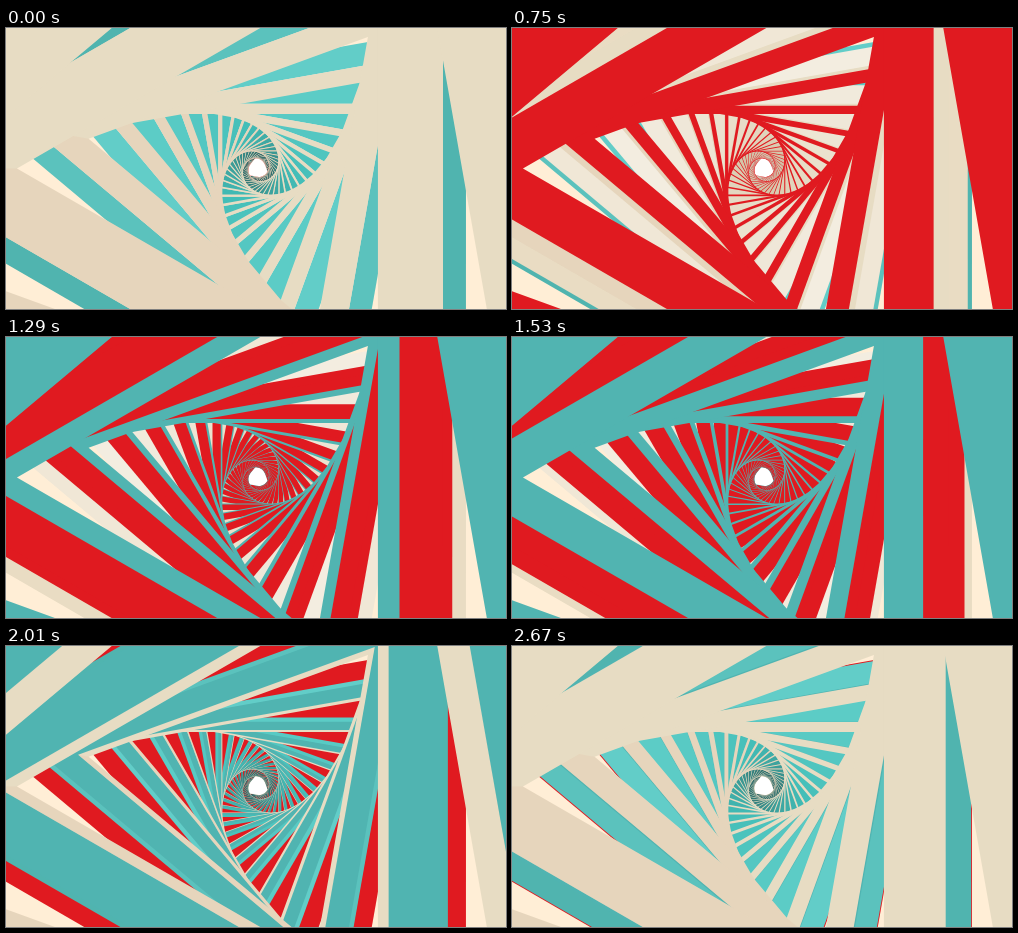
Recreate the animation shown at these times as an HTML page without scripts. Size 500 px wide and 281 px high, loop 2700 ms.

```html
<!DOCTYPE html>
<html lang="en">
<head>
<meta charset="utf-8">
<title>Triangle tunnel</title>
<style>
@property --front { syntax: "<number>"; inherits: true; initial-value: 0; }
@property --flare { syntax: "<number>"; inherits: true; initial-value: 0; }

html, body { margin: 0; height: 100%; overflow: hidden; background: #fff; }

svg {
  display: block; width: 100vw; height: 100vh; background: #fff;
  animation: front 900ms infinite, flare 900ms steps(30) infinite;
}

/* --front: depth reached by the newest colour, in plate spacings; it stays hidden for one step.
   --flare: progress of the previous colour from there to the rim. */
@keyframes front {
  0% { --front: -1; animation-timing-function: step-end; }
  3.3333% { --front: 0.029; animation-timing-function: steps(29); }
  100% { --front: 0.872; }
}
@keyframes flare { from { --flare: 0; } to { --flare: 1; } }

/* One plate: --k counts inward, perspective gives the size */
.tunnel > g {
  --z: calc(var(--k) + 2.485);
  --rim: calc(1.05 + var(--k) * (0.2 + 0.05 * min(var(--k), 3)));
  --up: max(var(--k), 0);
  --red: #e01a20;
  --flat-teal: #51b4b1;
  --flat-beige: #e7dcc3;
  --teal: hsl(177 min(40% + 6% * var(--up), 54% - 0.6% * var(--up)) max(32%, min(51% + 5% * var(--up), 62% - 1.3% * var(--up))));
  --deep-teal: hsl(178 40% max(32%, min(51%, 62% - 1.3% * var(--up))));
  --beige: hsl(40 calc(46% - 0.8% * var(--up)) max(74%, min(84% + 5% * var(--up), 94% - 1.2% * var(--up))));
  transform: rotate(calc(var(--k) * 10deg)) scale(calc(299 / var(--z)));
  animation: colours 2700ms step-end infinite;
}

@keyframes colours {
  0%, 100% {
    --new: var(--red); --mid: var(--beige); --tone: var(--flat-beige); --old: var(--teal);
    --new-tint: 0; --tone-tint: 0.4;
  }
  33.3333% {
    --new: var(--flat-teal); --mid: var(--red); --tone: var(--red); --old: var(--beige);
    --new-tint: 0; --tone-tint: 0;
  }
  66.6667% {
    --new: var(--flat-beige); --mid: var(--teal); --tone: var(--deep-teal); --old: var(--red);
    --new-tint: 0.4; --tone-tint: 0;
  }
}

.band { transform: scale(calc(var(--z) / (var(--z) - var(--s)))); }
.old { --s: var(--rim); fill: var(--old); }
.mid { --s: calc(0.872 + var(--flare) * (var(--rim) - 0.872)); fill: var(--mid); }
.tone { --s: 0.872; fill: var(--tone); }
.new { --s: var(--front); fill: var(--new); }
.tint { fill: #e4cab2; }
.tone.tint { fill-opacity: var(--tone-tint); }
.new.tint { fill-opacity: var(--new-tint); }
</style>
</head>
<body>
<svg viewBox="0 0 500 281">
  <defs>
    <mask id="plate" maskUnits="userSpaceOnUse" x="-42" y="-42" width="84" height="84">
      <path fill="#fff" fill-rule="evenodd" d="M-42-42H42V42H-42zM-2 0L1-1.73205V1.73205z"/>
    </mask>
    <g id="wall" mask="url(#plate)">
      <path fill="#ffeed6" d="M-42-42H42V42H-42z"/>
      <path class="band old" d="M-2 0L1-1.73205V1.73205z"/>
      <path class="band mid" d="M-2 0L1-1.73205V1.73205z"/>
      <path class="band tone" d="M-2 0L1-1.73205V1.73205z"/>
      <path class="band tone tint" d="M0 0L-2 0L1 1.73205z"/>
      <path class="band new" d="M-2 0L1-1.73205V1.73205z"/>
      <path class="band new tint" d="M0 0L-2 0L1 1.73205z"/>
    </g>
  </defs>
  <g transform="translate(251.6 140.5)">
    <g class="tunnel">
      <g style="--k:34"><use href="#wall"/></g>
      <g style="--k:33"><use href="#wall"/></g>
      <g style="--k:32"><use href="#wall"/></g>
      <g style="--k:31"><use href="#wall"/></g>
      <g style="--k:30"><use href="#wall"/></g>
      <g style="--k:29"><use href="#wall"/></g>
      <g style="--k:28"><use href="#wall"/></g>
      <g style="--k:27"><use href="#wall"/></g>
      <g style="--k:26"><use href="#wall"/></g>
      <g style="--k:25"><use href="#wall"/></g>
      <g style="--k:24"><use href="#wall"/></g>
      <g style="--k:23"><use href="#wall"/></g>
      <g style="--k:22"><use href="#wall"/></g>
      <g style="--k:21"><use href="#wall"/></g>
      <g style="--k:20"><use href="#wall"/></g>
      <g style="--k:19"><use href="#wall"/></g>
      <g style="--k:18"><use href="#wall"/></g>
      <g style="--k:17"><use href="#wall"/></g>
      <g style="--k:16"><use href="#wall"/></g>
      <g style="--k:15"><use href="#wall"/></g>
      <g style="--k:14"><use href="#wall"/></g>
      <g style="--k:13"><use href="#wall"/></g>
      <g style="--k:12"><use href="#wall"/></g>
      <g style="--k:11"><use href="#wall"/></g>
      <g style="--k:10"><use href="#wall"/></g>
      <g style="--k:9"><use href="#wall"/></g>
      <g style="--k:8"><use href="#wall"/></g>
      <g style="--k:7"><use href="#wall"/></g>
      <g style="--k:6"><use href="#wall"/></g>
      <g style="--k:5"><use href="#wall"/></g>
      <g style="--k:4"><use href="#wall"/></g>
      <g style="--k:3"><use href="#wall"/></g>
      <g style="--k:2"><use href="#wall"/></g>
      <g style="--k:1"><use href="#wall"/></g>
      <g style="--k:0"><use href="#wall"/></g>
      <g style="--k:-1"><use href="#wall"/></g>
    </g>
  </g>
</svg>
</body>
</html>
```
